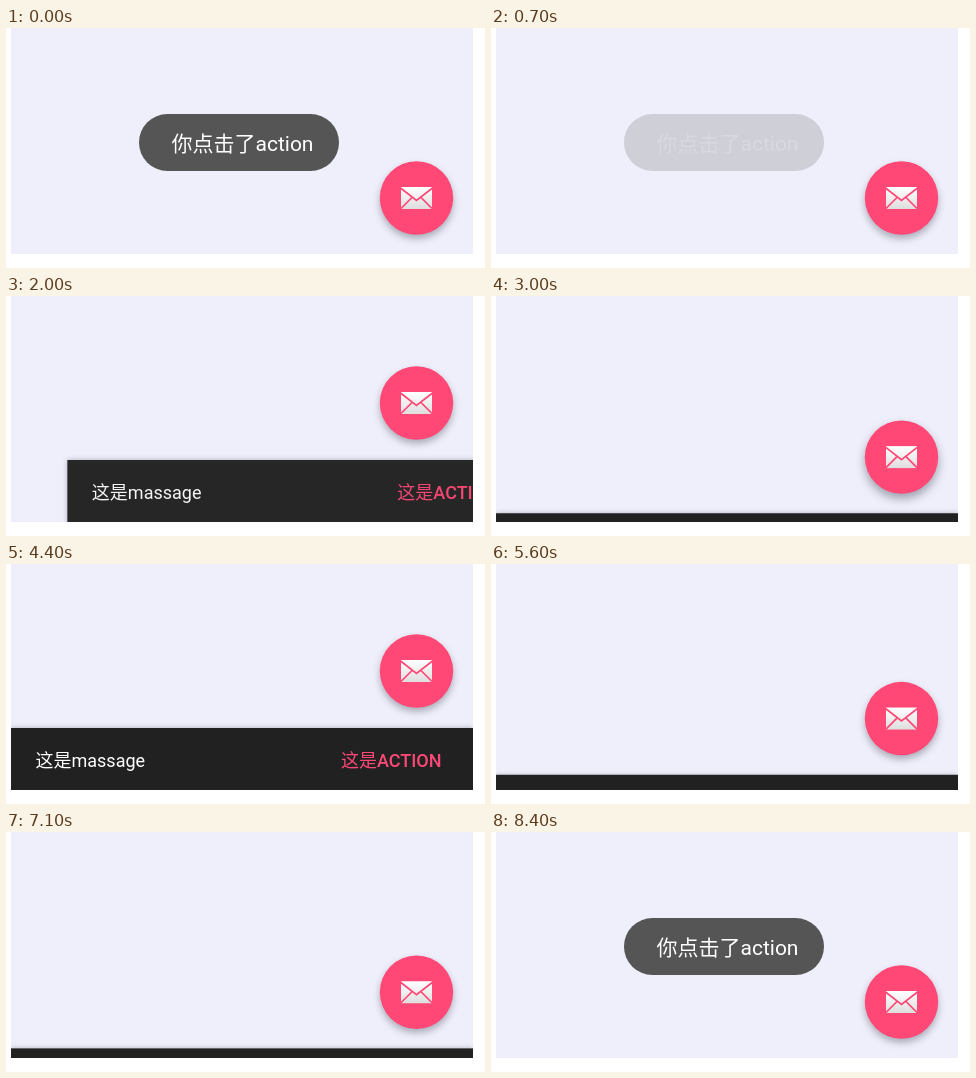
An HTML page with a canvas for the animation above (8500 ms loop, 479 by 240 pixels).

```html
<!DOCTYPE html>
<html lang="zh-CN">
<head>
<meta charset="utf-8">
<style>
html, body { margin: 0; width: 100%; height: 100%; overflow: hidden; background: #fff; }
canvas { display: block; width: 479px; height: 240px; }
</style>
</head>
<body>
<canvas id="stage" width="479" height="240"></canvas>
<script>
const ctx = document.getElementById('stage').getContext('2d');
const LOOP = 8500;
const SLIDE = 250;
const PAGE = { x: 5, y: 0, w: 462, h: 226 };
const BAR_H = 62, LIFT = 63;
const PINK = '#ff4876', DARK = '#212121';
const FONT = 'Roboto, "Noto Sans CJK SC", "Noto Sans CJK", sans-serif';

// Each bar slides in, then is swiped aside or slides back out.
const bars = [
  { show: 1245, swipe: 1960, drop: 2270 },
  { show: 2950, hide: 5480 },
  { show: 6342, hide: 6960 }
];
const presses = [[1140, 1350], [2860, 3060], [6080, 6400]];

const clamp = v => Math.max(0, Math.min(1, v));
const span = (t, start, len) => clamp((t - start) / len);
const smooth = v => (1 - Math.cos(Math.PI * v)) / 2;

// cubic-bezier(.4, 0, .2, 1)
function ease(x) {
  let lo = 0, hi = 1;
  for (let i = 0; i < 20; i++) {
    const u = (lo + hi) / 2, v = 1 - u;
    if (1.2 * u * v * v + 0.6 * u * u * v + u * u * u < x) lo = u; else hi = u;
  }
  return lo * lo * (3 - 2 * lo);
}

function shadow(alpha, blur, dy) {
  ctx.shadowColor = `rgba(40,40,60,${alpha})`;
  ctx.shadowBlur = blur;
  ctx.shadowOffsetY = dy;
}

function text(str, x, y, size, color, weight = 400) {
  ctx.font = `${weight} ${size}px ${FONT}`;
  ctx.fillStyle = color;
  ctx.fillText(str, x, y);
  return x + ctx.measureText(str).width;
}

function line(points) {
  ctx.beginPath();
  points.forEach(([x, y]) => ctx.lineTo(x, y));
  ctx.stroke();
}

function drawBar(left, lift, alpha, textAlpha) {
  const top = PAGE.h - BAR_H * lift;
  ctx.save();
  ctx.globalAlpha = alpha;
  shadow(0.35, 5, 0);
  ctx.fillStyle = DARK;
  ctx.fillRect(PAGE.x + left, top, PAGE.w, BAR_H + 2);
  shadow(0, 0, 0);
  ctx.globalAlpha = alpha * textAlpha;
  const base = top + 38.5;
  text('这是massage', left + 29.5, base, 18, '#fff');
  const x = text('这是', left + 335, base, 18, PINK);
  text('ACTION', x, base, 18, PINK, 500);
  ctx.restore();
}

function drawMail(x, y) {
  const w = 31, h = 22, mid = x + w / 2;
  const fill = ctx.createLinearGradient(0, y, 0, y + h);
  fill.addColorStop(0, '#fff');
  fill.addColorStop(1, '#dedede');
  ctx.fillStyle = fill;
  ctx.fillRect(x, y, w, h);
  ctx.strokeStyle = PINK;
  ctx.lineWidth = 1.7;
  line([[x - 0.5, y + 1], [mid, y + 13.5], [x + w + 0.5, y + 1]]);
  line([[x, y + h - 0.5], [x + 11, y + 10.5]]);
  line([[x + w, y + h - 0.5], [x + w - 11, y + 10.5]]);
}

function drawFab(lift, press) {
  const x = 410.5, y = 170 - LIFT * lift;
  ctx.save();
  shadow(0.34 + 0.06 * press, 7 + 3 * press, 4 + press);
  ctx.fillStyle = PINK;
  ctx.beginPath();
  ctx.arc(x, y, 36.7, 0, Math.PI * 2);
  ctx.fill();
  shadow(0, 0, 0);
  drawMail(x - 15.5, y - 11);
  ctx.restore();
}

function drawToast(alpha) {
  if (!alpha) return;
  ctx.save();
  ctx.globalAlpha = alpha;
  ctx.fillStyle = '#555';
  ctx.beginPath();
  ctx.roundRect(133, 86, 200, 57, 28.5);
  ctx.fill();
  const x = text('你点击了', 165.5, 122.5, 21, '#fff');
  ctx.fontStretch = 'condensed';
  text('action', x, 122.5, 21, '#fff');
  ctx.restore();
}

function draw(t) {
  ctx.fillStyle = '#fff';
  ctx.fillRect(0, 0, 479, 240);
  ctx.save();
  ctx.beginPath();
  ctx.rect(PAGE.x, PAGE.y, PAGE.w, PAGE.h);
  ctx.clip();
  ctx.fillStyle = '#eeeffa';
  ctx.fillRect(PAGE.x, PAGE.y, PAGE.w, PAGE.h);

  let fabLift = 0;
  for (const b of bars) {
    const end = b.drop || b.hide;
    if (t < b.show || t > end + SLIDE) continue;
    const out = ease(span(t, end, SLIDE));
    const lift = ease(span(t, b.show, SLIDE)) * (1 - out);
    fabLift = lift;
    let words = smooth(span(t, b.show + 70, 180));
    if (b.swipe) {
      const left = PAGE.w * Math.pow(span(t, b.swipe, 310), 1.04);
      const alpha = 1 - clamp((left / PAGE.w - 0.1) / 0.5);
      if (t < b.drop) drawBar(left, lift, alpha, words);
    } else {
      words *= 1 - smooth(span(t, b.hide, 180));
      if (lift > 0) drawBar(0, lift, 1, words);
    }
  }

  const press = Math.max(...presses.map(([a, b]) => span(t, a, 80) * (1 - span(t, b, 100))));
  drawFab(fabLift, press);
  drawToast(t < 4000 ? 1 - smooth(span(t, 350, 500)) : smooth(span(t, 7210, 290)));
  ctx.restore();
}

function frame() {
  draw(performance.now() % LOOP);
  requestAnimationFrame(frame);
}
frame();
</script>
</body>
</html>
```
